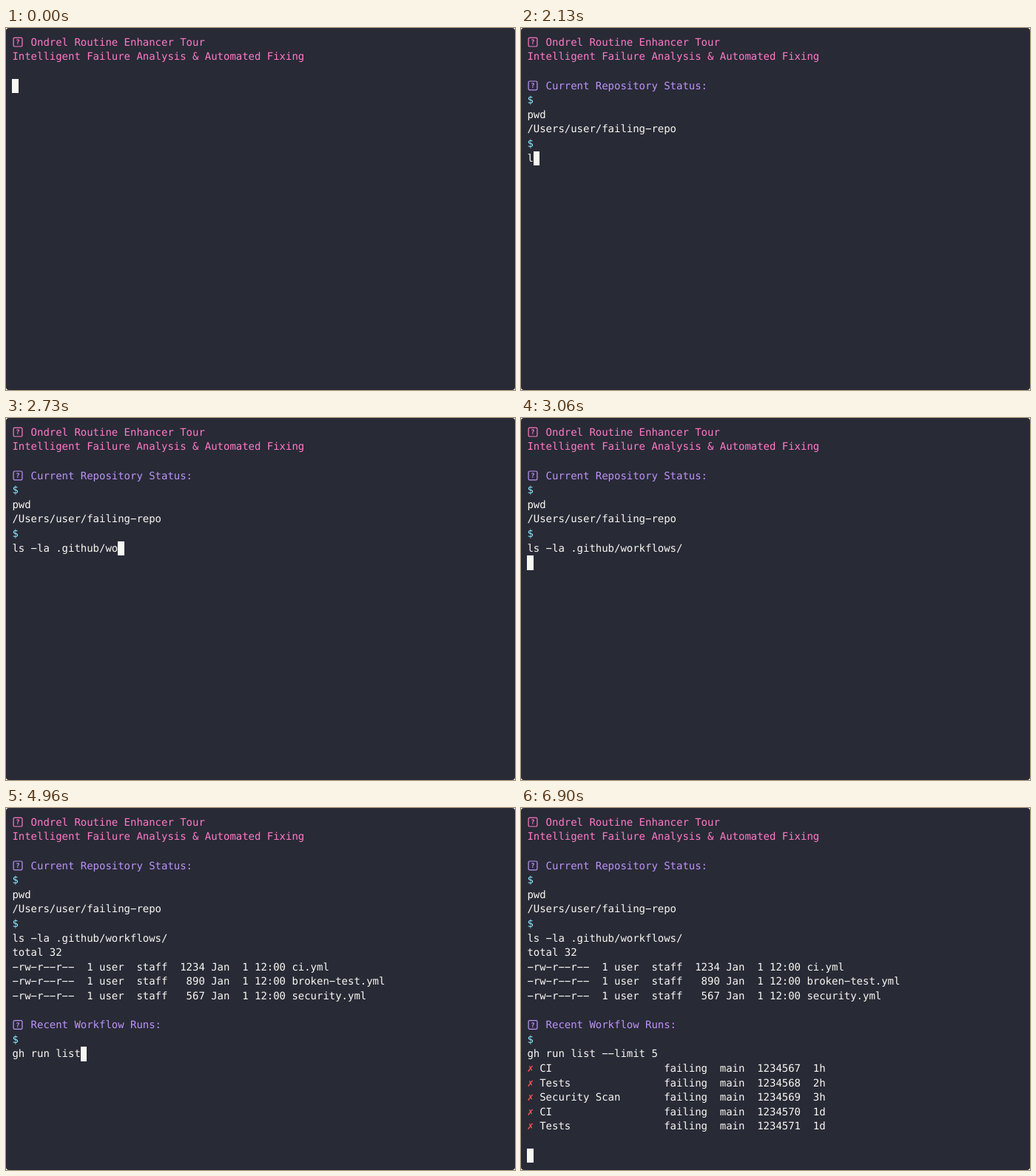
An HTML page for the animation above (8000 ms loop, 688x490 px).

```html
<!DOCTYPE html>
<html lang="en">
<head>
<meta charset="utf-8">
<title>Terminal session</title>
<style>
  html, body { margin: 0; width: 100%; height: 100%; overflow: hidden; background: #fff; }
  svg { display: block; }
  text {
    font: 14px "DejaVu Sans Mono", monospace;
    white-space: pre;
    text-rendering: geometricPrecision;
  }
  .mark { font-size: 9px; font-weight: bold; text-anchor: middle; }
</style>
</head>
<body>
<svg id="stage" width="688" height="490" viewBox="0 0 688 490">
  <rect width="688" height="490" rx="4" fill="#282a36"/>
</svg>
<script>
const LOOP = 8000, CELL_W = 8.4, CELL_H = 19.6;
const FG = '#f8f8f2', PINK = '#ff79c6', PURPLE = '#bd93f9', CYAN = '#8be9fd', RED = '#ff5555';
const stage = document.getElementById('stage');
const colX = col => CELL_W * (col + 1);
const rowY = row => CELL_H * (row + 0.5);

function add(tag, attrs, parent = stage) {
  const el = document.createElementNS('http://www.w3.org/2000/svg', tag);
  for (const key in attrs) el.setAttribute(key, attrs[key]);
  parent.append(el);
  return el;
}

// Groups of output that become visible together
const groups = [];
function group(at) {
  const el = add('g', {});
  groups.push({ at, el });
  return el;
}

// One glyph per terminal cell; hyphens use the wide dash form
function print(parent, row, col, str, fill) {
  const x = Array.from(str, (_, i) => colX(col + i).toFixed(1)).join(' ');
  const el = add('text', { x, y: rowY(row) + 14, fill }, parent);
  el.textContent = str.replace(/-/g, '\u2212');
  return el;
}

function heading(parent, row, str, fill) {
  const y = rowY(row);
  add('rect', { x: 10.1, y: y + 3.4, width: 11.8, height: 11.8, rx: 1.6,
    fill: 'none', stroke: fill, 'stroke-width': 1.2 }, parent);
  add('text', { class: 'mark', x: 16, y: y + 12.6, fill }, parent).textContent = '?';
  print(parent, row, 3, str, fill);
}

const intro = group(0);
heading(intro, 0, 'Ondrel Routine Enhancer Tour', PINK);
print(intro, 1, 0, 'Intelligent Failure Analysis & Automated Fixing', PINK);

const status = group(500);
heading(status, 3, 'Current Repository Status:', PURPLE);
print(status, 4, 0, '$', CYAN);

print(group(1120), 6, 0, '/Users/user/failing-repo', FG);
print(group(2130), 7, 0, '$', CYAN);

const listing = group(3570);
print(listing, 9, 0, 'total 32', FG);
[[1234, 'ci.yml'], [890, 'broken-test.yml'], [567, 'security.yml']].forEach(([size, name], i) =>
  print(listing, 10 + i, 0,
    `-rw-r--r--  1 user  staff  ${String(size).padStart(4)} Jan  1 12:00 ${name}`, FG));

const recent = group(4570);
heading(recent, 14, 'Recent Workflow Runs:', PURPLE);
print(recent, 15, 0, '$', CYAN);

const runs = group(5890);
[['CI', '1h'], ['Tests', '2h'], ['Security Scan', '3h'], ['CI', '1d'], ['Tests', '1d']]
  .forEach(([name, age], i) => {
    print(runs, 17 + i, 0, '✗', RED);
    print(runs, 17 + i, 2, `${name.padEnd(20)}failing  main  ${1234567 + i}  ${age}`, FG);
  });

// Typed commands: first key at start, return key at end
const commands = [
  { row: 5, str: 'pwd', start: 500, end: 610 },
  { row: 8, str: 'ls -la .github/workflows/', start: 2130, end: 3060 },
  { row: 16, str: 'gh run list --limit 5', start: 4570, end: 5380 }
];
for (const cmd of commands) {
  cmd.el = print(stage, cmd.row, 0, cmd.str, FG);
  cmd.full = cmd.el.textContent;
}

// Resting cursor rows: [time, row]
const rests = [[0, 3], [610, 6], [1120, 7], [3060, 9], [3570, 13], [5380, 17], [5890, 22], [6900, 23]];
const cursor = add('rect', { width: CELL_W, height: CELL_H, fill: FG, 'shape-rendering': 'crispEdges' });

// Key times fall on a 10 ms clock
function typedCount({ str, start, end }, t) {
  const step = (end - start) / str.length;
  let n = 0;
  while (n < str.length && t >= Math.round((start + n * step) / 10) * 10) n++;
  return n;
}

function render(t) {
  for (const { at, el } of groups) el.setAttribute('visibility', t >= at ? 'visible' : 'hidden');

  let row = rests.filter(([at]) => t >= at).pop()[1];
  let col = 0;
  for (const cmd of commands) {
    const n = typedCount(cmd, t);
    if (n !== cmd.shown) {
      cmd.el.textContent = cmd.full.slice(0, n);
      cmd.shown = n;
    }
    if (t >= cmd.start && t < cmd.end) {
      row = cmd.row;
      col = n;
    }
  }
  cursor.setAttribute('x', colX(col));
  cursor.setAttribute('y', rowY(row));
}

const origin = performance.now();
function tick() {
  render((performance.now() - origin) % LOOP);
  requestAnimationFrame(tick);
}
tick();
</script>
</body>
</html>
```
